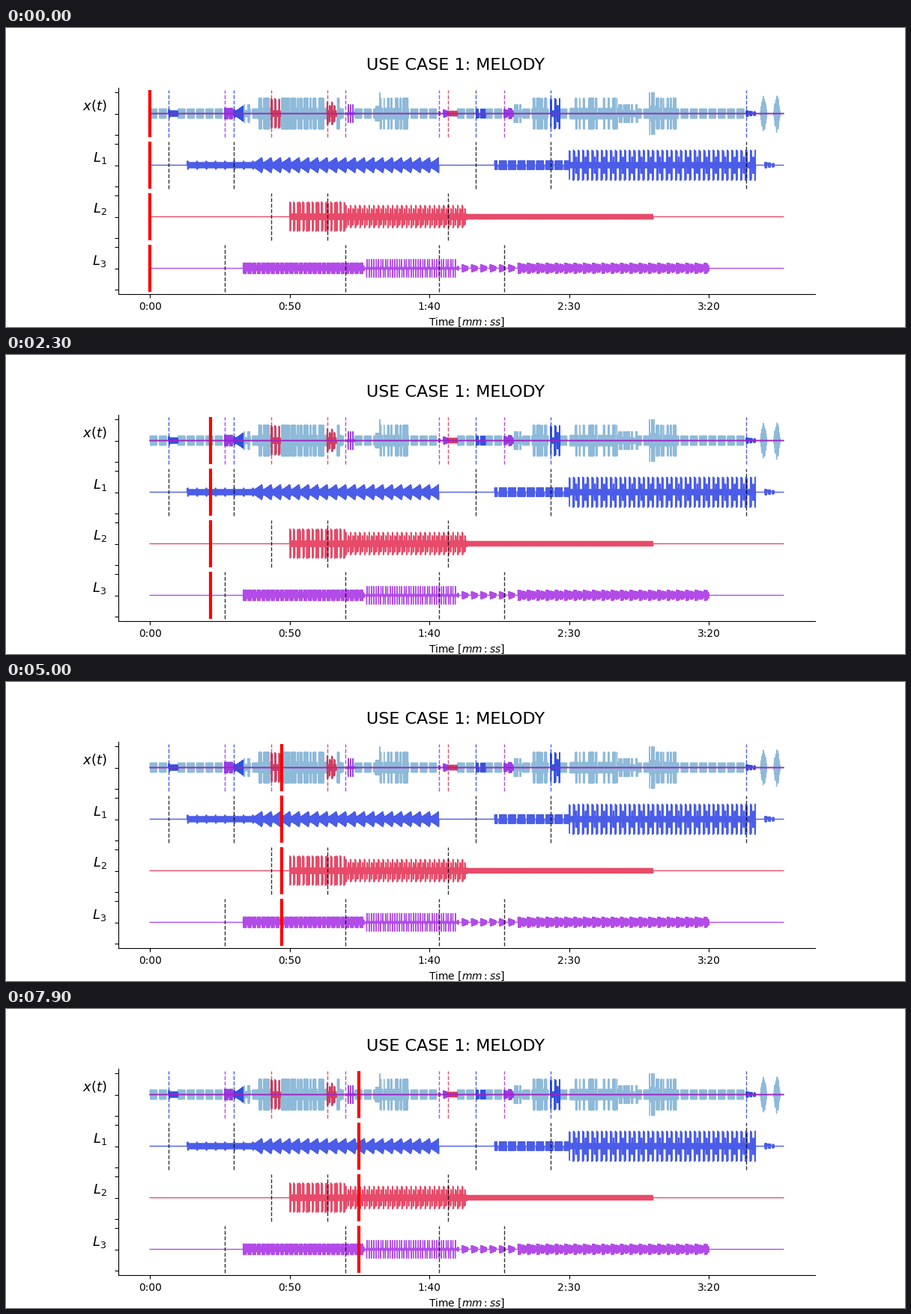
A matplotlib script for the animation above (8 s loop, 1200x400 px).

```python
import numpy as np
import matplotlib.pyplot as plt
from matplotlib.animation import FuncAnimation
from matplotlib.ticker import FuncFormatter

BAR = 10 / 3            # seconds per bar
BARS = 68
RES = 36                # samples per bar
STEP = 0.9444           # seconds the cursor moves per frame
FRAMES, INTERVAL = 80, 100

LIGHT, BLUE, RED, PURPLE = "#1f77b4", "#1e34e3", "#e21e43", "#9f1ee2"
SOFT, MID, LOUD, PEAK = .22, .42, .72, .98

# bars in which each loop is recorded; it plays back two bars later
TAKES = {BLUE: (2, 9, 35, 43, 64), RED: (13, 19, 32), PURPLE: (8, 21, 31, 38)}

# bar at which the live signal changes level
SECTIONS = {0: SOFT, 10: MID, 10.7: SOFT, 11.6: LOUD, 20.5: SOFT, 24.2: PEAK,
            24.7: LOUD, 27.7: SOFT, 39: MID, 40: SOFT, 41.1: LOUD, 42.6: SOFT,
            45: LOUD, 50.2: MID, 52.4: SOFT, 53.6: PEAK, 54.2: LOUD, 56.5: SOFT,
            64: 0}

t = (np.arange(BARS * RES) + 0.5) / RES
phase = t % 1
flip = np.where(np.arange(t.size) % 2, -1, 1)


def span(a, b):
    return (t >= a) & (t < b)


def pulse(rate, width, shift=0):
    """On for the first part of every beat, at a given number of beats per bar."""
    return ((t - shift) * rate) % 1 < width


def decay(rate, amount, shift=0):
    """Falls from 1 by the given amount over every beat."""
    return 1 - amount * (((t - shift) * rate) % 1)


def loop_one():
    soft = span(4, 31) * np.where(pulse(1, .12), .19, .12)
    swell = span(11, 31) * (.09 + .27 * phase ** 1.3)
    fade = span(12, 31) * .36 * np.clip(1 - phase / .2, 0, 1)
    blocks = span(37, 45) * .21 * (pulse(1, .28) | pulse(1, .52, .48))
    hits = np.where(pulse(2, .32, -.07), .72 * decay(2, .3, -.07), .12)
    hits = np.maximum(hits, .38 * pulse(1, .14, .7))
    tail = span(66, 67) * .13 * pulse(2.5, .6) * decay(1, .4)
    return np.maximum.reduce([soft, swell, fade, blocks, span(45, 65) * hits, tail])


def loop_two():
    first = np.where(pulse(2.5, .36, np.floor(t)), .7 * decay(2.5, .3, np.floor(t)), .13)
    accent = np.where(pulse(2, .5), .55, .4)
    second = np.where(pulse(4, .45), accent * decay(4, .3), .14)
    return span(15, 21) * first + span(21, 34) * second + span(34, 54) * .11


def loop_three():
    first = span(10, 23) * np.where(pulse(2, .7), .25, .11)
    comb = span(23.15, 33) * np.where(pulse(4, .2), .42, .04)
    blobs = span(33, 39.5) * .18 * pulse(1, .65, .5) * decay(1, .9, .5)
    dense = span(39.5, 60) * .25 * decay(1, .4, .5) * np.where(pulse(2, .75), 1, .65)
    return first + comb + blobs + dense


def live():
    rng = np.random.default_rng(4)
    index = np.searchsorted(list(SECTIONS), t, side="right") - 1
    level = np.array(list(SECTIONS.values()))[index]
    # loud parts are cut into random short notes, soft ones into one block a bar
    notes = np.repeat(np.where(rng.random(BARS * 6) < .65, 1, .35), RES // 6)
    gate = np.where(level > SOFT, notes * pulse(1, .92, .08), pulse(1, .75))
    swell = (t > 65.4) * .9 * np.cos(2 * np.pi * (t - 65.87) / 1.43)
    return np.maximum(level * gate, swell * rng.uniform(.7, 1, t.size))


def taken(takes):
    return np.isin(np.floor(t), takes)


def wave(ax, level, color, alpha=0.8):
    x = np.concatenate([[0], t, [BARS]]) * BAR
    y = np.concatenate([[0], level * flip, [0]])
    ax.plot(x, y, color=color, alpha=alpha, lw=1)


def marks(ax, takes, color):
    ax.vlines(np.array(takes) * BAR, -1.1, 1.1, color=color, ls="--", lw=1, alpha=0.8)


fig, axes = plt.subplots(4, 1, figsize=(12, 4), dpi=100, sharex=True)
fig.subplots_adjust(left=0.125, right=0.9, bottom=0.11, top=0.8, hspace=0)
fig.text(0.5, 0.86, "USE CASE 1: MELODY", fontsize=16, ha="center", va="baseline")

loops = {BLUE: loop_one(), RED: loop_two(), PURPLE: loop_three()}
takes_heard = {c: np.roll(loop, -2 * RES) * taken(TAKES[c]) for c, loop in loops.items()}

mix = live()
for color, heard in takes_heard.items():
    mix = np.where(taken(TAKES[color]), heard, mix)

top = axes[0]
wave(top, mix, LIGHT, 0.5)
for ax, (color, loop) in zip(axes[1:], loops.items()):
    wave(top, takes_heard[color], color)
    marks(top, TAKES[color], color)
    wave(ax, loop, color)
    marks(ax, TAKES[color], "black")

cursors = []
for ax, name in zip(axes, ("$x(t)$", "$L_1$", "$L_2$", "$L_3$")):
    ax.set_xlim(-0.05 * BARS * BAR, 1.05 * BARS * BAR)
    ax.set_ylim(-1.21, 1.21)
    ax.set_yticks([-1, 0, 1], labels=[])
    ax.spines[["top", "right", "bottom"]].set_visible(False)
    ax.tick_params(bottom=False)
    ax.annotate(name, (0, 0.5), (-11.2, 0), xycoords="axes fraction",
                textcoords="offset points", fontsize=13, ha="right", va="bottom")
    cursors += ax.plot([0, 0], [-1.1, 1.1], color="red", lw=3,
                       solid_capstyle="butt", zorder=5)

last = axes[-1]
last.spines["bottom"].set_visible(True)
last.tick_params(bottom=True)
last.set_xticks(range(0, 201, 50))
last.xaxis.set_major_formatter(FuncFormatter(lambda s, _: f"{int(s) // 60}:{int(s) % 60:02d}"))
last.set_xlabel("Time [$mm:ss$]")


def update(i):
    for line in cursors:
        line.set_xdata([i * STEP] * 2)
    return cursors


anim = FuncAnimation(fig, update, frames=FRAMES, interval=INTERVAL,
                     repeat=True, repeat_delay=0)
plt.show()
```
